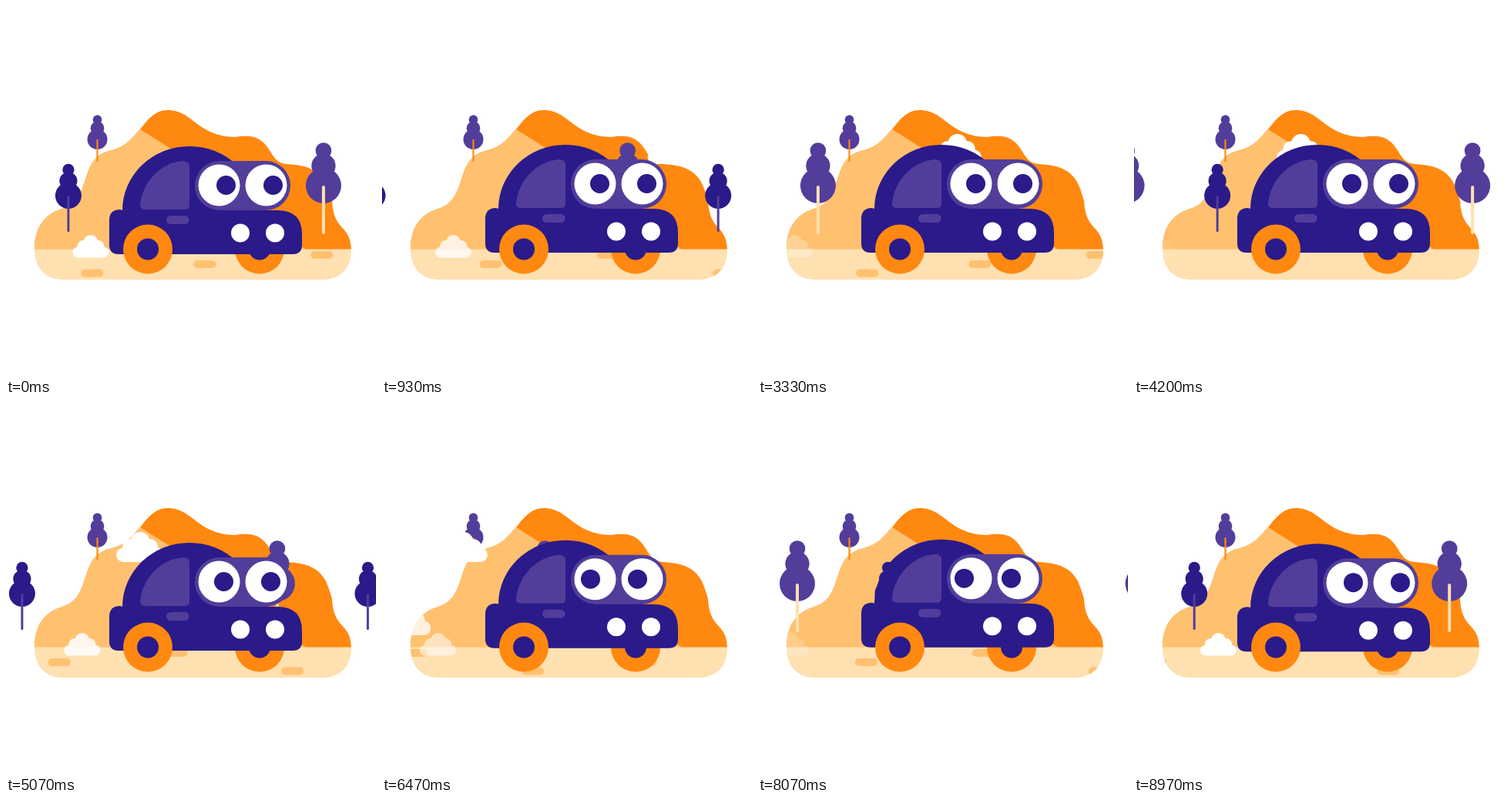
These frames come from a looping animation (480x480 px, 9010 ms). An HTML page with a canvas:

```html
<!DOCTYPE html>
<html lang="en">
<head>
<meta charset="utf-8">
<title>Little car</title>
<style>
  html, body { margin: 0; width: 100%; height: 100%; overflow: hidden; background: #fff; }
  canvas { display: block; }
</style>
</head>
<body>
<canvas id="stage" width="480" height="480"></canvas>
<script>
const ctx = document.getElementById('stage').getContext('2d');
const LOOP = 9010, SPAN = 448.5, PUFF = 4472;
const NAVY = '#2b1a89', PURPLE = '#523d9a', ORANGE = '#ff8810',
      PEACH = '#ffc170', SAND = '#ffe0b0', WHITE = '#fff';

const hill = new Path2D(`M37 316 C37 287 50 269 76 262 C112 248 94 198 134 188
  C158 182 163 171 174 160 C185 146 194 135 210 135 C242 135 248 169 297 170
  C331 164 337 180 347 195 C355 207 363 204 382 207 C412 213 417 232 423 253
  C425 293 447 283 448 316 Z`);
const lightSide = new Path2D('M0 40 L174 160 L212 184 L389 316 H0 Z');
const road = new Path2D('M37 315.5 H448 C448 340 434 355 411 355 H74 C51 355 37 340 37 315.5 Z');
const bodyShape = new Path2D(`M151 265 A87 83 0 0 1 325 265 H352 Q384 265 384 296 V310
  Q384 322 372 322 H146 Q134 322 134 310 V278 Q134 264 148 264 Z`);
const sideWindow = new Path2D(`M180 264 Q173 264 174 257 C178 227 201 203 230 201
  Q238 201 238 208 V258 Q238 264 232 264 Z`);

// time, body lift, pupil offset
const POSES = [
  [0, 0, 9], [150, -2, 6], [5070, -2, 6], [6470, -5.3, -6], [8070, -6.3, -9],
  [8500, -6.3, -9], [8940, 0, 9], [8970, -0.8, 8], [LOOP, -1.2, 7.5]
];

const wrap = (x, n) => ((x % n) + n) % n;

function fill(color, shape) {
  ctx.fillStyle = color;
  ctx.fill(shape);
}

function circle(color, x, y, r) {
  const p = new Path2D();
  p.arc(x, y, r, 0, 7);
  fill(color, p);
}

function pill(color, x, y, w, h) {
  const p = new Path2D();
  p.roundRect(x, y, w, h, h / 2);
  fill(color, p);
}

function tree(x, y, r, crown, trunk, length, width) {
  circle(crown, x, y, r);
  circle(crown, x, y - r * 1.12, r * 0.68);
  circle(crown, x, y - r * 1.97, r * 0.45);
  pill(trunk, x - width / 2, y, width, length);
}

function cloud(x, bottom, size, alpha) {
  const p = new Path2D();
  p.roundRect(-23.5, -14, 47, 14, 7);
  for (const [cx, cy, r] of [[-10, -15, 7.5], [0, -20, 9.5], [10, -15, 7.5]]) {
    p.moveTo(cx + r, cy);
    p.arc(cx, cy, r, 0, Math.PI * 2);
  }
  ctx.save();
  ctx.globalAlpha = Math.max(0, alpha);
  ctx.translate(x, bottom);
  ctx.scale(size, size);
  fill(WHITE, p);
  ctx.restore();
}

function pose(t) {
  const i = POSES.findIndex(k => k[0] > t);
  const a = POSES[i - 1], b = POSES[i];
  const u = (t - a[0]) / (b[0] - a[0]), e = u * u * (3 - 2 * u);
  return [a[1] + (b[1] - a[1]) * e, a[2] + (b[2] - a[2]) * e];
}

function scenery(t) {
  fill(ORANGE, hill);
  ctx.save();
  ctx.clip(hill);
  fill(PEACH, lightSide);
  ctx.restore();

  fill(SAND, road);
  ctx.save();
  ctx.clip(road);
  for (const [x, y] of [[112, 346.5], [258, 335], [410, 323]]) {
    const at = wrap(x - t * 0.1257, SPAN);
    for (const cx of [at, at + SPAN]) pill(PEACH, cx - 14.5, y - 5, 29, 10);
  }
  ctx.restore();

  tree(118.5, 173, 13, PURPLE, ORANGE, 29, 2.2);
  cloud(421 - t * 0.0487, 205, 1.32, 1);

  const age = t % PUFF;
  cloud(33 - (age - 1970) * 0.0187, 300, 1.32, 0.8 - Math.abs(age - 1970) / 1000);
  cloud(110 - age * 0.0187, 326.5, 1, 1 - age / PUFF);

  const shift = t * 0.1003;
  for (const off of [-SPAN, 0, SPAN]) {
    tree(wrap(81 - shift, SPAN) + off, 246, 17, NAVY, PURPLE, 47, 3);
    tree(wrap(412 - shift, SPAN) + off, 233, 23, PURPLE, SAND, 63, 4);
  }
}

function wheel(x) {
  circle(ORANGE, x, 315.5, 32);
  circle(NAVY, x, 315.5, 14);
}

function car(t) {
  const [lift, look] = pose(t);
  wheel(329);
  ctx.save();
  ctx.translate(0, lift);
  fill(NAVY, bodyShape);
  fill(PURPLE, sideWindow);
  pill(PURPLE, 208, 272, 29.5, 11);
  pill(PURPLE, 245, 201, 124, 64);
  for (const x of [276.5, 337.5]) {
    circle(WHITE, x, 232.5, 27);
    circle(NAVY, x + look, 232.5, 12.5);
  }
  for (const x of [304, 349]) circle(WHITE, x, 294.5, 12);
  ctx.restore();
  wheel(184);
}

function draw() {
  const t = performance.now() % LOOP;
  fill(WHITE, new Path2D('M0 0H480V480H0Z'));
  scenery(t);
  car(t);
  requestAnimationFrame(draw);
}
draw();
</script>
</body>
</html>
```
